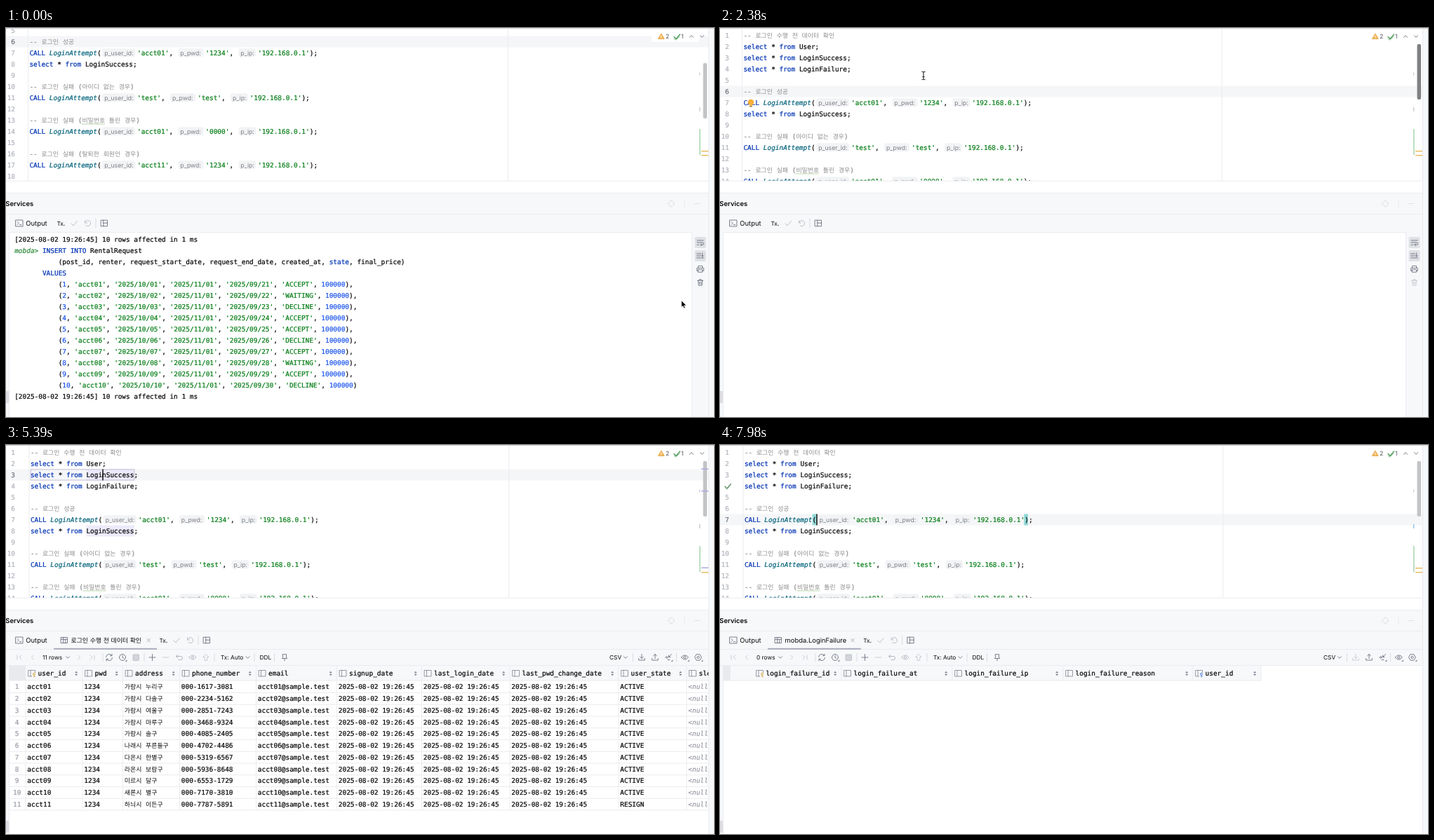
These frames come from a looping animation (1009 px wide and 555 px high, 8 s). An HTML page:

```html
<!DOCTYPE html>
<html lang="ko">
<head>
<meta charset="utf-8">
<title>SQL console</title>
<style>
html,body{margin:0;width:100%;height:100%;overflow:hidden;background:#fff}
svg{display:block;width:1009px;height:555px}
text{white-space:pre;text-rendering:geometricPrecision}
.m{font:9.43px "DejaVu Sans Mono","Noto Sans Mono",monospace;stroke-width:.22px}
.u{font:9.43px Inter,Roboto,sans-serif}
.s{font:8.3px Inter,Roboto,sans-serif}
.h{font:8.7px Inter,Roboto,sans-serif}
.k{font-family:"Noto Sans CJK KR","Noto Sans CJK",sans-serif}
.m.k,.u .k{font-size:8.9px}
.m.k{stroke-width:0}
.b{font-weight:600}
.i{font-style:italic}
</style>
</head>
<body>
<svg id="stage" viewBox="0 0 1009 555" xmlns="http://www.w3.org/2000/svg"></svg>
<script>
const LOOP = 8000, TICK = 70, CW = 5.677, KW = 8.19, ROW = 16;
const PANEL = '#f7f8fa', LINE = '#ebecf0', INK = '#080808', ICON = '#6c707e', DIM = '#c5c8d0';
const BLUE = '#0033b3', GREEN = '#067d17', NOTE = '#8c8c8c', NUM = '#1750eb', CALL = '#00627a';
const YELLOW = '#e8b85a', LILAC = '#a9a6dd', USAGE = '#eceafa', BRACKET = '#93d9d9';
const DB = 'mobda';
const id = n => 'acct' + String(n).padStart(2, '0');

const esc = s => s.replace(/&/g, '&amp;').replace(/</g, '&lt;').replace(/>/g, '&gt;');
const rect = (x, y, w, h, fill, more = '') =>
  `<rect x="${x}" y="${y}" width="${w}" height="${h}" fill="${fill}" ${more}/>`;
const hline = (x, y, w, c = LINE) => rect(x, y, w, 1, c);
const vline = (x, y, h, c = LINE) => rect(x, y, 1, h, c);
const icon = (x, y, d, c = ICON, w = 0.9, fill = 'none') =>
  `<path transform="translate(${x} ${y})" d="${d}" fill="${fill}" stroke="${c}" stroke-width="${w}" stroke-linecap="round" stroke-linejoin="round"/>`;
const ui = (x, y, s, cls = 'u', c = INK, more = '') =>
  `<text class="${cls}" x="${x}" y="${y + 3.4}" fill="${c}" ${more}>` +
  esc(s).replace(/[가-힣]+/g, k => `<tspan class="k">${k}</tspan>`) + '</text>';

const span = s => [...s].reduce((w, c) => w + (/[가-힣]/.test(c) ? KW : CW), 0);
function mono(x, y, s, c = INK, cls = '') {
  let out = '';
  for (const part of s.match(/[가-힣]+|[^가-힣]+/g) || []) {
    const k = /[가-힣]/.test(part) ? 'k' : '';
    if (part.trim()) out += `<text class="m ${k} ${cls}" x="${x}" y="${y + 3.4}" fill="${c}" stroke="${c}">${esc(part)}</text>`;
    x += span(part);
  }
  return out;
}

const HINT = { 'p_user_id:': 51.4, 'p_pwd:': 40.6, 'p_ip:': 29.2 };
const TOKEN = /\{(.+?)\}|('[^']*')|(--.*)|\b(CALL|select|from|INSERT|INTO|VALUES|state)\b|(LoginAttempt)|\b(\d+)\b|[^'{\w-]+|\w+|./g;
function code(x, y, s) {
  let out = '';
  for (const m of s.matchAll(TOKEN)) {
    if (m[1]) {
      const w = HINT[m[1]];
      out += rect(x + 1.7, y - 6.3, w - 4.6, 12, '#f2f3f5', 'rx="3"') + ui(x + 4.6, y - 0.3, m[1], 'h', '#7d7f85');
      x += w;
      continue;
    }
    const c = m[2] ? GREEN : m[3] ? NOTE : m[4] ? BLUE : m[5] ? CALL : m[6] ? NUM : INK;
    out += mono(x, y, m[0], c, m[5] ? 'i' : '');
    x += span(m[0]);
  }
  return out;
}

const call = (user, pwd) => `CALL LoginAttempt({p_user_id:}'${user}', {p_pwd:}'${pwd}', {p_ip:}'192.168.0.1');`;
const SOURCE = [
  '-- 로그인 수행 전 데이터 확인', 'select * from User;', 'select * from LoginSuccess;', 'select * from LoginFailure;', '',
  '-- 로그인 성공', call(id(1), '1234'), 'select * from LoginSuccess;', '',
  '-- 로그인 실패 (아이디 없는 경우)', call('test', 'test'), '',
  '-- 로그인 실패 (비밀번호 틀린 경우)', call(id(1), '0000'), '',
  '-- 로그인 실패 (탈퇴한 회원인 경우)', call(id(11), '1234'), ''
];
const lineY = n => 10.5 + (n - 1) * ROW;
const CODE = SOURCE.map((s, i) => code(33.4, lineY(i + 1), s)).join('') + hline(108, lineY(13) + 5, 33, '#b9d6ae');

const CHECK = 'M-4 .5L-1 3.5L4.5-3', UNDO = 'M-3.5-3.5V-.5H-.5M-3.3-.8A4 4 0 1 1-2 3.2',
  DOWN = 'M-2.5-1.2L0 1.3L2.5-1.2', LEFT = 'M1.3-3L-1.7 0L1.3 3', RIGHT = 'M-1.3-3L1.7 0L-1.3 3',
  GRID = 'M-4.5-4H4.5V4H-4.5ZM-4.5-1.2H4.5M-1.3-4V4M1.7-1.2V4',
  TRASH = 'M-4-2.7H4M-1.5-2.7V-4.2H1.5V-2.7M-3-2.7L-2.5 4.2H2.5L3-2.7M-1-.6V2.3M1-.6V2.3',
  EYE = 'M-5 0Q0-6.5 5 0Q0 6.5-5 0ZM-1.6 0a1.6 1.6 0 1 0 3.2 0a1.6 1.6 0 1 0-3.2 0';

// Output log
const STATES = 'ACCEPT WAITING DECLINE ACCEPT ACCEPT DECLINE ACCEPT WAITING ACCEPT DECLINE'.split(' ');
const STAMP = '2025-08-02 19:26:45', DONE = `[${STAMP}] 10 rows affected in 1 ms`;
const LOG = (() => {
  const y = n => 302 + n * ROW, col = n => 12.2 + n * CW;
  let s = mono(col(0), y(0), DONE) + mono(col(0), y(1), DB + '>', '#2c8a3a', 'i') +
    code(col(7), y(1), 'INSERT INTO RentalRequest') +
    code(col(11), y(2), '(post_id, renter, request_start_date, request_end_date, created_at, state, final_price)') +
    code(col(7), y(3), 'VALUES');
  STATES.forEach((st, i) => {
    const n = i + 1, d = String(n).padStart(2, '0');
    s += code(col(11), y(4 + i), `(${n}, '${id(n)}', '2025/10/${d}', '2025/11/01', '2025/09/${20 + n}', '${st}', 100000)${n < 10 ? ',' : ''}`);
  });
  return s + mono(col(0), y(14), DONE);
})();

const sideStrip = (top, grip) => rect(0, 291, 4, 264, PANEL) + vline(4, top, 555 - top) + rect(0, grip, 4, 17, '#dcdee3');

function output(cleared) {
  const wrap = 'M-4.5-3H4.5M-4.5 0H3Q5 0 5 1.7T3 3.3H.5M1.8 2L.3 3.3L1.8 4.6M-4.5 3.3H-2';
  return sideStrip(291, 518) + rect(977, 291, 24, 264, PANEL) + vline(977, 291, 264) +
    rect(981.5, 298, 16, 16, '#dfe1e5', 'rx="2"') + rect(981.5, 317, 16, 16, '#dfe1e5', 'rx="2"') +
    icon(989.5, 306, wrap) + icon(989.5, 325, 'M-5-3H1M-5 0H0M-5 3H5M3-4V1M1.2-.6L3 1.2L4.8-.6') +
    icon(989.5, 344, 'M-3-1.5V-4.5H3V-1.5M-3 2.5H-4.8V-1.5H4.8V2.5H3M-3 .8H3V4.3H-3Z') +
    icon(989.5, 363, TRASH, cleared ? DIM : ICON) + (cleared ? '' : LOG);
}

// Result grids; names marked + are primary keys, * are foreign keys
const TOWNS = '가람시 누리구,가람시 다솔구,가람시 여울구,가람시 마루구,가람시 솔구,나래시 푸른들구,다온시 한별구,라온시 보람구,미르시 달구,새론시 별구,하늬시 이든구'.split(',');
const VIEWS = [
  { tab: '로그인 수행 전 데이터 확인', x: 224, dark: 28, rows: 11,
    edges: [28, 109, 166.5, 247.5, 356.5, 471.5, 592.5, 718, 873, 970, 1050],
    names: 'user_id+,pwd,address,phone_number,email,signup_date,last_login_date,last_pwd_change_date,user_state,sleep_at' },
  { tab: DB + '.LoginSuccess', x: 217.7, dark: 15, rows: 0, edges: [48, 173, 331, 489, 586],
    names: 'login_success_id+,login_success_at,login_success_ip,user_id*' },
  { tab: DB + '.LoginFailure', x: 209.7, dark: 15, rows: 0, edges: [48, 173, 331, 489, 674, 771],
    names: 'login_failure_id+,login_failure_at,login_failure_ip,login_failure_reason,user_id*' }
];
const record = n => [id(n), '1234', TOWNS[n - 1], `000-${n * 617 % 9000 + 1000}-${n * 2081 % 9000 + 1000}`,
  id(n) + '@sample.test', STAMP, STAMP, STAMP, n < 11 ? 'ACTIVE' : 'RESIGN', '<null>'];

function gridBar(v) {
  const d = v.rows ? 0 : -2, ic = (x, p, c) => icon(x, 303, p, c), sep = x => vline(x, 297, 12, '#d9dbe1');
  return rect(0, 291, 1001, 23, PANEL) + hline(0, 291, 1001) + hline(0, 314, 1001) +
    ic(19, 'M-3-3V3M3-3L0 0L3 3', DIM) + ic(38, LEFT, DIM) + ui(52, 302.7, v.rows + ' rows', 's') +
    ic(88 + d, DOWN) + ic(104 + d, RIGHT, DIM) + ic(123 + d, 'M3-3V3M-3-3L0 0L-3 3', DIM) + sep(137.5 + d) +
    ic(147 + d, 'M-4.5-.5A4.5 4.5 0 0 1 3.6-2.8M4-4.8V-2.3H1.5M4.5.5A4.5 4.5 0 0 1-3.6 2.8M-4 4.8V2.3H-1.5') +
    ic(166 + d, 'M-4.5 0a4.5 4.5 0 1 0 9 0a4.5 4.5 0 1 0-9 0M0-2.7V.3L2 1.4M4.5 5.5H6V4') +
    rect(181 + d, 299, 8.5, 8.5, '#d3d5db', 'stroke="#b4b8c2" stroke-width=".8" rx="1"') + sep(196.5 + d) +
    ic(208.5 + d, 'M-4.5 0H4.5M0-4.5V4.5') + ic(227.5 + d, 'M-4.5 0H4.5', DIM) +
    ic(247 + d, 'M-2-4L-4.5-1.5L-2 1M-4.5-1.5H2Q4.5-1.5 4.5 1T2 3.5H-1', '#a8adb8') + ic(266 + d, EYE, '#b4b8c2') +
    ic(285 + d, 'M0-4.5L4-.5H1.8V4.3H-1.8V-.5H-4Z', DIM) + sep(296.5 + d) +
    ui(306 + d, 302.7, 'Tx: Auto', 's') + ic(344.5 + d, DOWN) + sep(353.5 + d) + ui(361.5 + d, 302.7, 'DDL', 's') + sep(382 + d) +
    ic(397 + d, 'M-2.5-4.3H2.5V0L3.7 1.5H-3.7L-2.5 0ZM0 1.5V4.7') +
    ui(860, 302.7, 'CSV', 's') + ic(883, DOWN) + sep(893) +
    ic(906, 'M0-4.5V1.5M-2.4-.8L0 1.5L2.4-.8M-4.3 1.5V4H4.3V1.5', v.rows ? ICON : DIM) +
    ic(925, 'M0 1.5V-4.5M-2.4-2.2L0-4.5L2.4-2.2M-4.3 1.5V4H4.3V1.5') +
    ic(944, 'M4.5-4.5L.5-.5M.5-3V-.5H3M-4.5 0H-1M-2.5-1.7L-.8 0L-2.5 1.7M-1 3.5H2M4.5 5.5H6V4') + sep(955) +
    ic(967.5, EYE + 'M4.5 5.5H6V4') +
    ic(986.5, 'M-2.4-4.2H2.4L4.8 0L2.4 4.2H-2.4L-4.8 0ZM-1.6 0a1.6 1.6 0 1 0 3.2 0a1.6 1.6 0 1 0-3.2 0M5 5.5H6.3V4');
}

function grid(v) {
  const end = v.edges[v.edges.length - 1];
  let s = sideStrip(314, 536) + gridBar(v) + rect(4, 315, end - 4, 21, PANEL) +
    rect(4, 315, v.dark - 4, 21, '#e8eaee') + hline(4, 335.5, end - 4);
  v.names.split(',').forEach((name, i) => {
    const x = v.edges[i], next = v.edges[i + 1], key = /[+*]/.exec(name);
    s += icon(x + 8.5, 326, 'M-4.5-4.5H5V4H-4.5ZM-1.5-4.5V4', '#7e8390', 0.8);
    if (key) {
      const c = key[0] === '+' ? '#d9a441' : '#4a7be0';
      s += rect(x + 9, 325, 6, 6, PANEL) + icon(x + 12, 326.8, 'M-1.5 0a1.5 1.5 0 1 0 3 0a1.5 1.5 0 1 0-3 0M0 1.5V4.2M0 3.4H1.4', c, 0.9);
    }
    s += mono(x + 17.6, 326, name.replace(/[+*]/, '')) +
      icon(next - 8.7, 326, 'M-1.4-1H1.4L0-2.8ZM-1.4 1H1.4L0 2.8Z', ICON, 0.4, ICON) +
      vline(next - 0.5, 315, v.rows ? 205 : 21);
  });
  if (v.rows) s += vline(27.5, 315, 205);
  for (let n = 1; n <= v.rows; n++) {
    const y = 345 + (n - 1) * 16.75;
    s += mono(15.7 - String(n).length * CW / 2, y, String(n), '#9a9da6') + hline(4, y + 8, 997);
    record(n).forEach((val, i) => s += mono(v.edges[i] + 2.3, y, val, i === 9 ? '#9a9da6' : INK, i === 9 ? 'i' : ''));
  }
  return `<g clip-path="url(#win)">${s}</g>`;
}
const GRIDS = VIEWS.map(grid);

function tabs(v) {
  const x = v ? v.x : 78;
  let s = icon(19, 278.5, 'M-5-4.5H5V4.5H-5ZM-2.8-2L-.8 0L-2.8 2M.5 2.2H2.8') + ui(28.3, 278.5, 'Output') +
    ui(x - 5.5, 278.3, 'Tx', 's') + icon(x + 5, 281.5, 'M-1-.6H1L0 .7Z', ICON, 0.3, ICON) +
    icon(x + 19, 278.5, CHECK, '#b4b8c2') + icon(x + 38, 278.5, UNDO, '#b4b8c2') +
    vline(x + 49.5, 272, 13, '#d9dbe1') + icon(x + 62, 278.5, 'M-4.5-4.3H4.5V4.3H-4.5ZM-1.2-4.3V4.3M-1.2-.3H4.5');
  if (v) s += icon(83, 278.5, GRID) + ui(92.5, 278.5, v.tab) + icon(x - 20.7, 278.5, 'M-2.3-2.3L2.3 2.3M2.3-2.3L-2.3 2.3', '#9a9da6', 0.8) +
    rect(68, 289.8, x - 77, 2, '#a8adbd');
  return s;
}

const FRAME = rect(0, 218, 1001, 17, '#fff') + hline(0, 217.7, 1001) + rect(0, 235, 1001, 56, PANEL) +
  hline(0, 235, 1001) + hline(0, 265, 1001) + hline(0, 291, 1001) +
  ui(-0.7, 250.7, 'Services', 'u b') +
  icon(948, 250.5, 'M-4 0a4 4 0 1 0 8 0a4 4 0 1 0-8 0M0-5V-3M0 3V5M-5 0H-3M3 0H5', '#e0e2e7') +
  icon(967, 250.5, 'M0-3.5V-3.4M0 0V.1M0 3.5V3.6', '#d5d8de', 1.3) + icon(985, 250.5, 'M-4 0H4', '#e0e2e7');
const EDGE = rect(1001, 0, 8, 555, PANEL) + vline(1001, 0, 555) + rect(0, 0, 1009, 1.2, '#d3d5da');
const STATUS = rect(920, 4, 68, 16, '#fff', 'rx="3"') +
  icon(934, 12, 'M0-3.7L4.2 3.5H-4.2Z', '#e5a13a', 0.9, '#f4b95c') + icon(934, 12, 'M0-1V1M0 2.3V2.4', '#fff', 0.9) +
  ui(940, 11.8, '2', 'h', '#55585f') + icon(956, 12, CHECK, '#4f9d5b', 1.3) + icon(956, 15, 'M-4 0L-1.5 2L4-3', '#4f9d5b', 0.8) +
  ui(962, 11.8, '1', 'h', '#55585f') + icon(977, 12, 'M-2.7 1.3L0-1.3L2.7 1.3') + icon(992, 12, 'M-2.7-1.3L0 1.3L2.7-1.3');

const statement = n => SOURCE[n - 1].replace(';', '');
function popup(n) {
  const x = n === 2 ? 135 : 136.5, y = n * ROW + 2.5;
  return `<g transform="translate(${x} ${y})">` + rect(0, 0, 255, 83, '#fff', 'rx="6" filter="url(#shade)"') +
    rect(0, 28.5, 255, 17, '#d4e2ff') + `<path d="M0 68.5H255V77a6 6 0 0 1-6 6H6a6 6 0 0 1-6-6Z" fill="${PANEL}"/>` +
    ui(129.5, 14.5, 'Statements', 'u b', INK, 'text-anchor="middle"') + ui(1.3, 37, statement(n)) +
    ui(1.3, 54.7, SOURCE[0] + ' select * from User; select * fr...') + ui(2.6, 75.7, 'Customize', 'u', '#3a5f9e') +
    rect(0, 0, 255, 83, 'none', 'rx="6" stroke="#c4c7cf" stroke-width=".7"') + '</g>';
}

// Value of the latest [time, value] pair reached
const at = (t, steps) => steps.reduce((v, s) => t >= s[0] ? s[1] : v, steps[0][1]);
const PATH = [[0, 962.5, 389], [400, 988, 361], [600, 988, 361], [840, 981, 322], [1150, 640, 180], [1470, 75, 20],
  [1750, 75, 20], [1820, 306, 79], [2100, 306, 79], [2380, 290, 68], [2800, 190, 40], [3150, 137.5, 22], [3220, 137.5, 22]];
function pointer(t) {
  const i = PATH.findIndex(p => p[0] > t);
  if (i < 0) return '';
  const a = PATH[i - 1], b = PATH[i], k = (t - a[0]) / (b[0] - a[0]);
  const x = a[1] + (b[1] - a[1]) * k, y = a[2] + (b[2] - a[2]) * k;
  return y > 218 ? icon(x, y, 'M0 0V9.5L2.2 7.5L3.8 11L5.5 10.2L4 6.9H7Z', '#fff', 0.7, '#000')
    : icon(x, y, 'M-2.2-5.7Q0-5.7 0-4.5Q0-5.7 2.2-5.7M0-4.5V4.5M-2.2 5.7Q0 5.7 0 4.5Q0 5.7 2.2 5.7M-1.2 1.5H1.2', '#222', 1.1);
}

function editor(t, pop) {
  const k = Math.min(1, Math.max(0, (t - 1750) / 350)), scroll = 71 * (1 - k) ** 2;
  const dx = t >= 4130 ? 1.5 : 0;
  // line and caret position; zero hides the caret
  const [row, caret] = at(t, [[0, [6, 0]], [1470, [6, 74.7]], [2240, [6, 0]], [3080, [2, 136]], [4550, [3, 137.3]],
    [6160, [4, 137.3]], [7350, [5, 35]], [7490, [6, 98.5]], [7980, [7, 137.3]]]);
  const tick = at(t, [[0, 0], [4410, 2], [5250, 0], [5600, 3], [6860, 0], [7350, 4]]);
  const box = at(t, [[0, 0], [3500, 2], [4900, 3], [6510, 4], [7840, 0]]);
  const band = (n, x, w, c) => rect(x, lineY(n) - 8, w, ROW, c);
  const width = n => span(statement(n));
  let s = band(row, 0, 1001, '#f5f6f8') + vline(31 + dx, -20, 400) + vline(714.8 + dx, -20, 400);
  if (row === 3 || row === 4) s += band(row, 114.5, 68.5, USAGE);
  if (row === 3) s += band(8, 114.5, 68.5, USAGE);
  if (row === 7) s += band(7, 131.7, 6, BRACKET) + band(7, 433.2, 5.8, BRACKET);
  if (pop) s += band(pop, 33.5 + dx, width(pop), '#c9c8f6');
  else if (box) s += rect(33.7 + dx, lineY(box) - 7.6, width(box), 15.2, 'none', 'stroke="#b9b3cf" stroke-width=".8"');
  s += `<g transform="translate(${dx} 0)">${CODE}</g>`;
  SOURCE.forEach((_, i) => {
    const n = i + 1, y = lineY(n), label = String(n);
    s += n === tick ? icon(11, y, CHECK, '#5f9069', 1.2) + icon(11, y + 1.5, 'M-4 1L-1 3.5L4.5-3', '#8fb598', 0.7)
      : mono(13 - label.length * CW, y, label, n === row ? '#6c707e' : '#b0b3bb');
  });
  if (caret && !pop) s += band(row, caret, 1.4, '#000');
  if (t >= 1680 && t < 3080) {
    const y = lineY(6) + 17;
    s += icon(44, y, 'M-2 2.5Q-4 .5-4-1.5A4 4 0 0 1 4-1.5Q4 .5 2 2.5Z', '#f2a52c', 0.5, '#f7b03b') + rect(42, y + 3.2, 4, 2, '#b98a4a');
  }
  const marks = at(t, [
    [0, [[175, YELLOW], [181, YELLOW]]],
    [3640, [[27, '#7f93b5'], [175, YELLOW], [181, YELLOW]]],
    [4550, [[33.5, LILAC], [65, LILAC], [174.5, LILAC], [181, YELLOW]]],
    [6160, [[40, LILAC], [131.5, LILAC], [181, LILAC], [175, YELLOW]]],
    [7350, [[175, YELLOW], [181, YELLOW]]]
  ]);
  const thumb = at(t, [[0, '#c3c4c6'], [1820, '#7f8082'], [4130, '#c3c4c6']]);
  return `<g clip-path="url(#edit)"><g transform="translate(0 ${-scroll})">${s}</g>${STATUS}` +
    rect(993.5, 23 + scroll * 0.38, 5.5, 79, thumb, 'rx="2"') +
    marks.map(m => rect(991, m[0], 10, 1.4, m[1])).join('') +
    rect(988, 63.5, 1.2, 4, '#c9ccd3') + rect(988, 113, 1.4, 6, row === 7 ? '#8fc3ea' : '#c9ccd3') +
    rect(988.2, 144, 1.4, 37, '#9fd3a8') + '</g>';
}

const DEFS = '<defs><clipPath id="edit"><rect width="1001" height="218"/></clipPath>' +
  '<clipPath id="win"><rect width="1001" height="555"/></clipPath>' +
  '<filter id="shade" x="-10%" y="-15%" width="120%" height="140%"><feDropShadow dx="0" dy="2.5" stdDeviation="3.5" flood-opacity=".25"/></filter></defs>';
const stage = document.getElementById('stage');
let last = -1;

function draw(now) {
  const t = Math.floor(now % LOOP / TICK) * TICK;
  if (t === last) return;
  last = t;
  const view = at(t, [[0, -1], [4130, 0], [5460, 1], [7000, 2]]);
  const pop = at(t, [[0, 0], [3640, 2], [3990, 0], [5040, 3], [5250, 0], [6650, 4], [6860, 0]]);
  stage.innerHTML = DEFS + rect(0, 0, 1009, 555, '#fff') + editor(t, pop) + FRAME +
    (view < 0 ? output(t >= 520) : GRIDS[view]) + tabs(VIEWS[view]) + (pop ? popup(pop) : '') + EDGE + pointer(t);
}
const start = performance.now();
function loop() {
  draw(performance.now() - start);
  requestAnimationFrame(loop);
}
loop();
</script>
</body>
</html>
```
